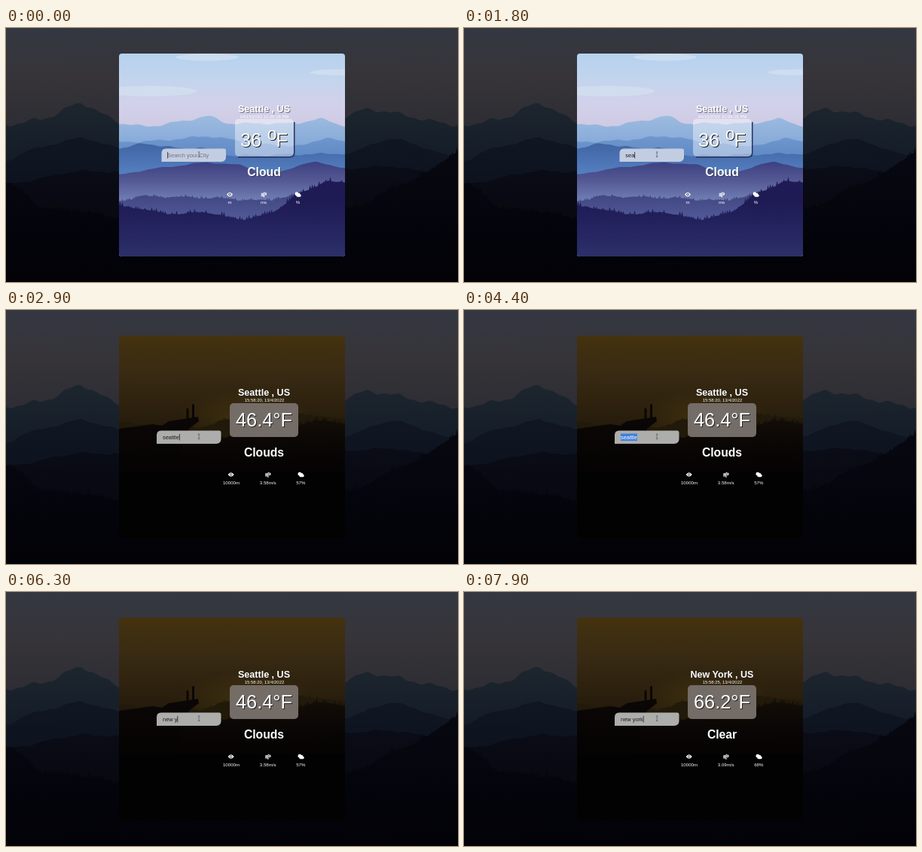
Write an HTML page that moves like this. It is 600x338 px and loops after 8 s.

```html
<!DOCTYPE html>
<html lang="en">
<head>
<meta charset="utf-8">
<title>Weather search</title>
<style>
  html, body { margin: 0; width: 100%; height: 100%; overflow: hidden; background: #05060c; }
  svg { display: block; width: 600px; height: 338px; }
  text { font-family: "Liberation Sans", Arial, sans-serif; white-space: pre; }
  .info { fill: #fff; text-anchor: middle; }
  .city { font-size: 12.55px; font-weight: bold; filter: drop-shadow(1px 1px 0 #2228); }
  .date { font-size: 5.9px; }
  .temp { font-size: 25.4px; filter: drop-shadow(1.8px 1.8px 0 #222); }
  .sky { font-size: 15.7px; font-weight: bold; }
  .stat { font-size: 6.1px; }
  .bright .sky { filter: drop-shadow(1px 1px 0 #2228); }
  .field { font-size: 7.45px; }
</style>
</head>
<body>
<svg viewBox="0 0 600 338">
  <defs>
    <clipPath id="card"><rect x="150" y="34" width="300" height="270" rx="4"/></clipPath>
    <radialGradient id="glow">
      <stop offset="0" stop-color="#5a4610" stop-opacity=".45"/>
      <stop offset="1" stop-color="#5a4610" stop-opacity="0"/>
    </radialGradient>
    <path id="input" d="M6 0H83Q85.5 0 85.5 3V11Q85.5 17.5 79 17.5H0V6Q0 0 6 0Z"/>
    <g id="eye">
      <path d="M-4 0Q0-5.6 4 0Q0 5.6-4 0Z" fill="#fff"/>
      <circle r="1.7" fill="#34333f"/><circle r=".9" fill="#fff"/>
    </g>
    <path id="wind" d="M-3.2-1.3H-.6Q1-1.6.5-2.7M-3.2.4H2.2Q3.7 0 3-1.6Q2.4-2.4 1.7-1.6M-3.2 2H-.4Q1 2.6 0 3.2"
      fill="none" stroke="#fff" stroke-width="1.1" stroke-linecap="round"/>
    <g id="cloud" fill="#fff">
      <circle cx="-1.6" cy="-.8" r="2.4"/>
      <rect x="-2.2" y="-.2" width="6.4" height="3.5" rx="1.7"/>
      <circle cx="1" cy="0" r="2"/>
    </g>
  </defs>

  <g id="backdrop"></g>

  <g id="bright" class="bright">
    <g id="lake" clip-path="url(#card)"></g>
    <rect x="304" y="121" width="78" height="50" rx="5" fill="#fff" opacity=".42"/>
    <path d="M382.7 125V166Q382.7 171.7 377 171.7H308" fill="none" stroke="#28305a" stroke-width="1.5"/>
    <g class="info">
      <text class="city" x="342.5" y="111.5">Seattle , US</text>
      <text class="date" x="343" y="119.7">04/15/2022 10:26:16 PM</text>
      <g class="temp" text-anchor="start">
        <text x="311" y="158.3">36</text>
        <text x="346.8" y="149" font-size="23">o</text>
        <text x="358.6" y="158.3">F</text>
      </g>
      <text class="sky" x="342.5" y="197.3">Cloud</text>
      <use href="#eye" x="297" y="221.5"/>
      <use href="#wind" x="342.3" y="221.5"/>
      <use href="#cloud" x="387.5" y="221.5"/>
      <text class="stat" x="297" y="234.3">m</text>
      <text class="stat" x="342" y="234.3">ms</text>
      <text class="stat" x="387.5" y="234.3">%</text>
    </g>
    <use href="#input" x="206.5" y="160.5" fill="#c3cde2"/>
  </g>

  <g id="dark">
    <g id="cliff" clip-path="url(#card)"></g>
    <rect x="297" y="124" width="91" height="45" rx="5" fill="#746c66"/>
    <g class="info">
      <text class="city" id="city" x="342.5" y="114"></text>
      <text class="date" id="date" x="343" y="122"></text>
      <text class="temp" id="temp" x="342.5" y="155.3"></text>
      <text class="sky" id="sky" x="342.5" y="194.7"></text>
      <use href="#eye" x="298.7" y="219"/>
      <use href="#wind" x="347.8" y="219"/>
      <use href="#cloud" x="391.5" y="219"/>
      <text class="stat" x="299" y="231.8">10000m</text>
      <text class="stat" id="speed" x="347.7" y="231.8"></text>
      <text class="stat" id="damp" x="391.3" y="231.8"></text>
    </g>
    <use href="#input" x="200" y="160.5" fill="#adadab"/>
  </g>

  <rect id="mark" x="208" y="164.5" width="22" height="9.5" fill="#3f7fe0"/>
  <text id="typed" class="field" y="171.6"></text>
  <rect id="caret" y="165" width=".8" height="8.5" fill="#222"/>
  <path d="M254.8 165H257.4M256.1 165V171.5M254.8 171.5H257.4" fill="none" stroke="#555b68" stroke-width=".8"/>
</svg>

<script>
const $ = id => document.getElementById(id);
const NS = "http://www.w3.org/2000/svg";

function add(parent, tag, attrs) {
  const el = document.createElementNS(NS, tag);
  for (const key in attrs) el.setAttribute(key, attrs[key]);
  parent.append(el);
  return el;
}

let seed = 7;
const rand = () => (seed = seed * 16807 % 2147483647) / 2147483647;

let gradients = 0;
function fade(colors, y1, y2) {
  const id = "fade" + gradients++;
  const grad = add(document.querySelector("defs"), "linearGradient",
    { id, gradientUnits: "userSpaceOnUse", x1: 0, x2: 0, y1, y2 });
  colors.forEach((color, i) =>
    add(grad, "stop", { offset: i / (colors.length - 1), "stop-color": color }));
  return `url(#${id})`;
}

// Height of a skyline at x: eased between its key points.
function heightAt(points, x) {
  const next = points.findIndex(p => p[0] > x);
  if (next < 0) return points.at(-1)[1];
  const [x0, y0] = points[next - 1], [x1, y1] = points[next];
  const u = (x - x0) / (x1 - x0);
  return y0 + (y1 - y0) * (u + (1 - Math.cos(Math.PI * u)) / 2) / 2;
}

// Filled hills; rough adds rolling bumps, trees a jagged edge.
function ridge(parent, fill, points, { rough = 1, trees = 0 } = {}) {
  const left = points[0][0], right = points.at(-1)[0], phase = rand() * 6;
  let d = `M${left} 340`;
  for (let x = left; x <= right; x += 1.5) {
    const bump = rough * (Math.sin(x * .13 + phase) + Math.sin(x * .31 + phase) / 2);
    const tooth = Math.round(x / 1.5) % 2 ? rand() ** 2 * trees : 0;
    d += `L${x} ${(heightAt(points, x) + bump - tooth).toFixed(1)}`;
  }
  add(parent, "path", { d: d + "V340Z", fill });
}

function paintBackdrop() {
  const g = $("backdrop");
  add(g, "rect", { width: 600, height: 338, fill: fade(["#343841", "#363439", "#2d2d33"], 0, 130) });
  ridge(g, fade(["#1d262f", "#141d27"], 100, 175),
    [[0, 129], [45, 122], [100, 100], [150, 125], [450, 117], [480, 108], [600, 129]], { rough: 2 });
  ridge(g, fade(["#101722", "#0d131e"], 145, 210),
    [[0, 178], [30, 162], [100, 146], [150, 159], [450, 167], [512, 147], [600, 172]]);
  ridge(g, fade(["#0a0c17", "#080911"], 185, 240),
    [[0, 208], [100, 190], [300, 200], [510, 184], [600, 200]]);
  ridge(g, fade(["#06070f", "#04050c", "#020207"], 190, 330),
    [[0, 206], [50, 240], [300, 275], [450, 244], [535, 205], [600, 167]], { trees: 9 });
}

function paintLake() {
  const g = $("lake");
  add(g, "rect", { x: 150, y: 34, width: 300, height: 270, fill: fade(["#b5d2ee", "#c3d4ed", "#d2d1ea", "#cfc9e2"], 34, 135) });
  for (const [cx, cy, rx] of [[190, 84, 63], [267, 39, 42], [440, 59, 36]])
    add(g, "ellipse", { cx, cy, rx, ry: rx / 9, fill: "#d3e0f1", opacity: .75 });
  ridge(g, fade(["#9cbbe0", "#80a4d5"], 118, 165),
    [[150, 127], [190, 131], [235, 124], [268, 117], [295, 127], [382, 127], [418, 121], [450, 130]]);
  ridge(g, fade(["#7299cf", "#5b86c4"], 140, 180),
    [[150, 152], [200, 150], [268, 144], [340, 155], [390, 157], [425, 146], [450, 152]]);
  ridge(g, fade(["#3f639f", "#4a71b2", "#5580c0"], 150, 195),
    [[150, 160], [183, 154], [240, 161], [258, 159], [300, 170], [450, 167]]);
  ridge(g, fade(["#3d4081", "#545994", "#6f7cb2"], 178, 228),
    [[150, 195], [205, 186], [265, 179], [310, 182], [345, 195], [412, 178], [450, 187]], { rough: .5 });
  ridge(g, fade(["#41457f", "#505a98"], 220, 254),
    [[150, 231], [180, 224], [260, 226], [340, 230], [380, 224], [450, 224]], { trees: 4 });
  ridge(g, fade(["#1f1a54", "#1f1b55", "#252561", "#2c3068"], 200, 304),
    [[150, 237], [225, 248], [260, 245], [314, 255], [345, 249], [400, 216], [426, 204], [450, 206]], { rough: .6, trees: 6 });
}

function paintCliff() {
  const g = $("cliff");
  add(g, "rect", { x: 150, y: 34, width: 300, height: 270, fill: fade(["#44320f", "#382a13", "#2a1f0d", "#1c140a"], 34, 190) });
  add(g, "ellipse", { cx: 318, cy: 145, rx: 90, ry: 40, fill: "url(#glow)" });
  ridge(g, "#211909", [[150, 150], [250, 158], [295, 146], [390, 139], [450, 146]], { trees: 4 });
  ridge(g, fade(["#130d07", "#080504", "#030202"], 145, 230),
    [[150, 176], [245, 176], [370, 160], [420, 146], [450, 154]], { trees: 8 });
  add(g, "path", {
    d: "M150 158L195 152L207 154L216 148L255 142L256 148L243 158L220 220L150 240Z",
    fill: fade(["#0b0706", "#040202"], 142, 220)
  });
  add(g, "path", { d: "M241 144V132M248.5 143V126.5", stroke: "#0a0706", "stroke-width": 3, "stroke-linecap": "round" });
  add(g, "rect", { x: 150, y: 215, width: 300, height: 90, fill: "#020202", opacity: .7 });
}

// Each burst extends the kept text letter by letter; pace above 1 slows it down.
const bursts = [
  { at: 500, step: 200, keep: "", keys: "se" },
  { at: 1800, step: 200, keep: "se", keys: "attle" },
  { at: 4800, step: 250, keep: "", keys: "new" },
  { at: 6100, step: 190, keep: "new", keys: " york", pace: 1.25 }
];
function textAt(t) {
  const burst = bursts.findLast(b => t >= b.at);
  if (!burst) return "";
  const { at, step, keep, keys, pace = 1 } = burst;
  return keep + keys.slice(0, Math.floor(((t - at) / step) ** (1 / pace)) + 1);
}

const reports = [
  { city: "Seattle , US", date: "15:58:20, 13/4/2022", temp: "46.4°F", sky: "Clouds", speed: "3.58m/s", damp: "57%" },
  { city: "New York , US", date: "15:58:25, 13/4/2022", temp: "66.2°F", sky: "Clear", speed: "3.09m/s", damp: "68%" }
];
const within = (t, from, to) => t >= from && t < to;
const show = (id, on) => $(id).style.display = on ? "" : "none";

function draw(t) {
  const loaded = t >= 2900;
  show("bright", !loaded);
  show("dark", loaded);
  const report = reports[t < 7700 ? 0 : 1];
  for (const id in report) $(id).textContent = report[id];

  const value = textAt(t);
  const selected = within(t, 4100, 4800);
  const left = loaded ? 208 : 214.3;
  const typed = $("typed");
  typed.textContent = value || "Search your City";
  typed.setAttribute("x", left);
  typed.setAttribute("fill", selected ? "#fff" : value ? "#1c1c22" : "#757575");
  show("mark", selected);
  show("caret", !selected && !within(t, 3200, 3700) && !within(t, 5900, 6100));
  $("caret").setAttribute("x", left + (value ? typed.getComputedTextLength() : 0));
}

paintBackdrop();
paintLake();
paintCliff();

const start = performance.now();
function tick() {
  draw((performance.now() - start) % 8000);
  requestAnimationFrame(tick);
}
tick();
</script>
</body>
</html>
```
